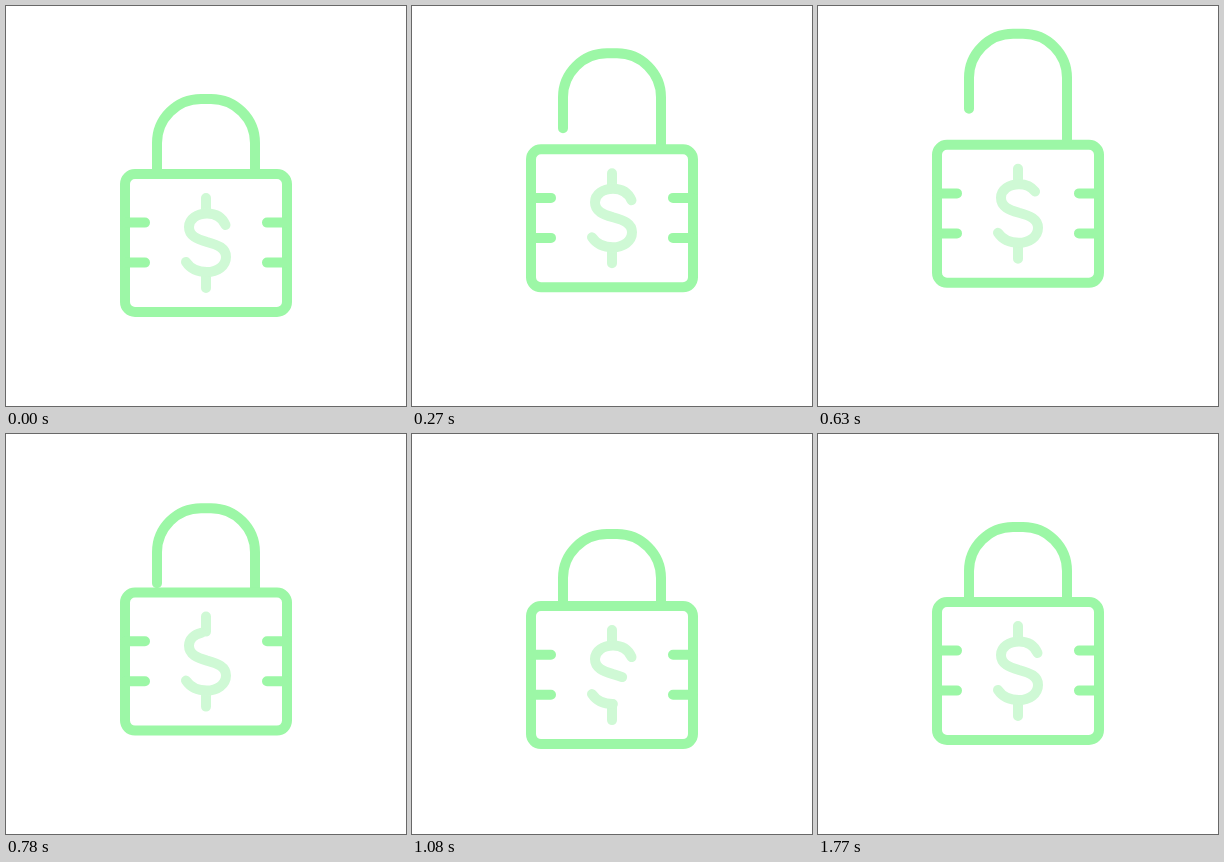
Animation of 400 by 400 pixels, one loop 1860 ms. Source, as an HTML page:

```html
<!DOCTYPE html>
<html lang="en">
<head>
<meta charset="utf-8">
<title>Padlock</title>
<style>
  html, body { margin: 0; width: 100%; height: 100%; overflow: hidden; background: #fff; }
  svg { display: block; width: 100vw; height: 100vh; }
  path, rect { fill: none; stroke: #9cf7a6; stroke-width: 10; stroke-linecap: round; stroke-linejoin: round; }
  #case { fill: #fff; }
  .coin path { stroke: #cff9d5; }
</style>
</head>
<body>
<svg viewBox="0 0 400 400">
  <path id="shackle"/>
  <g id="body">
    <rect id="case" x="119" y="168" width="162" height="138" rx="10"/>
    <path d="M119 216.6H139M119 256.6H139M261 216.6H281M261 256.6H281"/>
    <g class="coin">
      <path d="M200 192V207M200 267V282"/>
      <path id="head" pathLength="100"/>
      <path id="tail" pathLength="100"/>
    </g>
  </g>
</svg>
<script>
  const STEP = 30, LOOP = 1860, LAST = 59;
  const $ = id => document.getElementById(id);

  const linear = p => p;
  const easeIn = p => p ** 2.3;
  const easeOut = p => 1 - (1 - p) ** 2.7;
  const smooth = p => p * p * (3 - 2 * p);

  // Keys are [step, value, easing towards this key].
  function track(keys, n) {
    const i = keys.findIndex(k => k[0] > n);
    if (i === 0) return keys[0][1];
    if (i < 0) return keys[keys.length - 1][1];
    const [n0, v0] = keys[i - 1], [n1, v1, ease] = keys[i];
    return v0 + (v1 - v0) * ease((n - n0) / (n1 - n0));
  }

  const bounce = [[0, 0], [4, 13, smooth], [15.5, -35, easeOut], [29.3, 13, easeIn], [40, 0, smooth]];
  const lift = [[4, 0], [13, -36, smooth], [21, -36, linear], [29, 3, smooth],
                [36, 3, linear], [41, -3, smooth], [47, 0, smooth]];
  const eraser = [[20, 0], [30, 32, linear], [36, 84, linear], [40, 100, easeOut]];
  const writer = [[29.5, 0], [36, 55, linear], [47, 91.5, easeOut], [54, 89.5, smooth], [59, 100, smooth]];

  const dollar = "M219.5 219C216 211 209 207.5 201 207.5C191 207.5 183 213 183 221" +
    "C183 230 191 233 201 236C212 239 220 242 220 251C220 260 211 266 201 266C191 266 184 262 180 256";
  $("head").setAttribute("d", dollar);
  $("tail").setAttribute("d", dollar);

  function showPart(path, from, to) {
    path.style.visibility = to > from ? "visible" : "hidden";
    path.setAttribute("stroke-dasharray", `${to - from} 200`);
    path.setAttribute("stroke-dashoffset", -from);
  }

  function draw(time) {
    const n = Math.min(LAST, Math.floor((time % LOOP) / STEP));
    const y = track(bounce, n), top = 93 + y + track(lift, n);
    $("body").setAttribute("transform", `translate(0 ${y})`);
    $("shackle").setAttribute("d",
      `M151 ${top + 75}V${top + 44}A44 44 0 0 1 195 ${top}H205A44 44 0 0 1 249 ${top + 44}V${168 + y}`);
    showPart($("head"), 0, track(writer, n));
    showPart($("tail"), track(eraser, n), 100);
  }

  const start = performance.now();
  function tick() {
    draw(performance.now() - start);
    requestAnimationFrame(tick);
  }
  tick();
</script>
</body>
</html>
```
